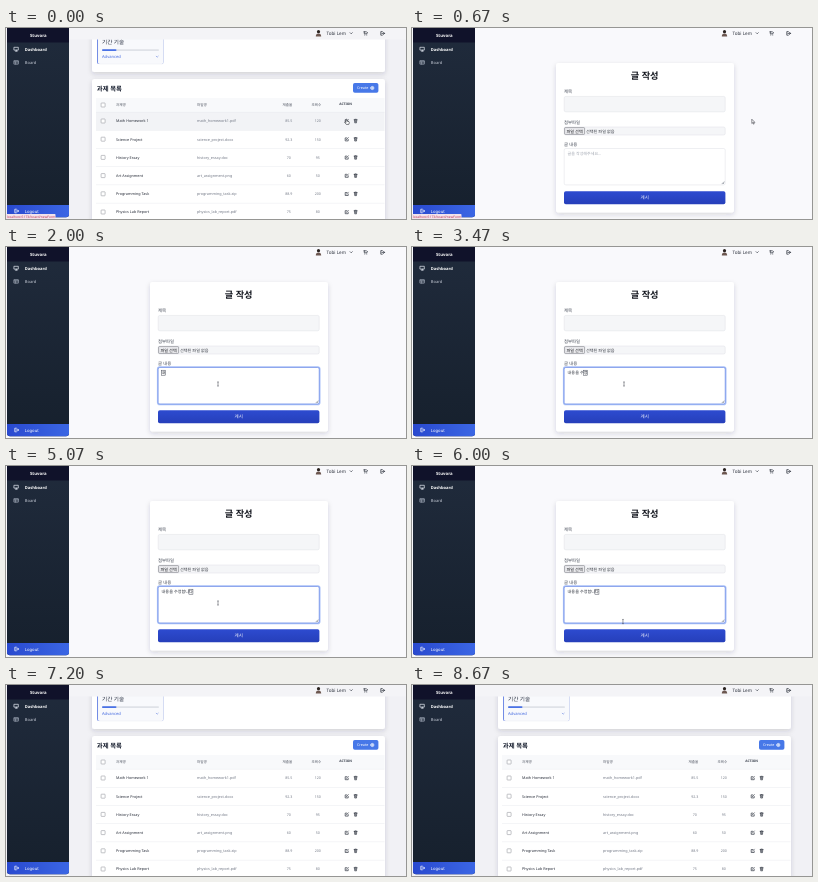
An HTML page that plays this animation: 400x191 px, repeating every 8.74 s.

```html
<!DOCTYPE html>
<html lang="ko">
<head>
<meta charset="utf-8">
<title>Board editor</title>
<style>
  html, body { margin: 0; width: 100%; height: 100%; overflow: hidden; background: #f8f8fb; }
  svg { display: block; width: 100%; height: 100%; }
  text { font-family: "Noto Sans", "Noto Sans CJK KR", "Noto Sans CJK", sans-serif; text-rendering: geometricPrecision; white-space: pre; }
  .icon { fill: none; stroke-width: .7; stroke-linecap: round; stroke-linejoin: round; }
</style>
</head>
<body>
<svg id="stage" viewBox="0 0 400 191" preserveAspectRatio="none">
  <defs>
    <linearGradient id="side" x2="0" y2="1"><stop stop-color="#202b3c"/><stop offset="1" stop-color="#16202d"/></linearGradient>
    <linearGradient id="exit"><stop stop-color="#2949cf"/><stop offset="1" stop-color="#3b66e4"/></linearGradient>
    <linearGradient id="send" x2="0" y2="1"><stop stop-color="#2d4bd0"/><stop offset="1" stop-color="#263fba"/></linearGradient>
    <filter id="shadow" x="-10%" y="-15%" width="120%" height="135%"><feDropShadow dx="0" dy="2" stdDeviation="2.6" flood-color="#20243c" flood-opacity=".16"/></filter>
    <clipPath id="sideClip"><rect x="1" y="-4" width="62" height="193.3" rx="3"/></clipPath>
  </defs>
</svg>
<script>
const LOOP = 8740;
const stage = document.getElementById('stage');

function add(parent, tag, attrs = {}) {
  const el = document.createElementNS('http://www.w3.org/2000/svg', tag);
  for (const key in attrs) el.setAttribute(key, attrs[key]);
  return parent.appendChild(el);
}
const group = (parent, attrs) => add(parent, 'g', attrs);
const box = (parent, x, y, width, height, fill, more) =>
  add(parent, 'rect', { x, y, width, height, fill, ...more });
function label(parent, x, y, size, str, fill, more) {
  const el = add(parent, 'text', { x, y, 'font-size': size, fill, ...more });
  el.textContent = str;
  return el;
}
const icon = (parent, x, y, d, stroke, more) =>
  add(parent, 'path', { class: 'icon', d, stroke, transform: `translate(${x} ${y})`, ...more });
const show = (el, on) => el.setAttribute('visibility', on ? 'inherit' : 'hidden');

const middle = { 'text-anchor': 'middle' };
const bold = { 'font-weight': 700 };
const semi = { 'font-weight': 500 };
const EXIT = 'M0 -1.8h-1.5v3.6h1.5 M-.4 0h2.6 M1.2 -1.1l1.1 1.1l-1.1 1.1';
const PENCIL = 'M0 -1.3h-1.5v3h3v-1.5 M-.4 .5l2 -2.1';
const TRASH = 'M-1.5 -1.2h3 M-.5 -1.7h1 M-1.1 -1.2l.2 3h1.8l.2 -3 M0 -.4v1.4';

const list = group(stage);
const form = group(stage);
const chrome = group(stage);

// Board list
box(list, 0, 0, 400, 191, '#f1f1f5');
box(list, 86, -10, 293, 54, '#fff', { rx: 2.5, filter: 'url(#shadow)' });
box(list, 91, -10, 66.5, 46, '#3b5fe0', { rx: 2 });
box(list, 91.9, -10, 65.6, 46, '#f8f9fc', { rx: 1.8, stroke: '#e6e8f0', 'stroke-width': .4 });
label(list, 96, 16, 5.6, '기간 기술', '#2c3344', semi);
box(list, 96, 21.2, 57, 1.8, '#dfe2e8', { rx: .9 });
box(list, 96, 21.2, 14.5, 1.8, '#4a72e6', { rx: .9 });
label(list, 96, 30.2, 4.1, 'Advanced', '#456be0');
icon(list, 151.2, 28.7, 'M-1 -.5l1 1l1 -1', '#7d96e4');
box(list, 63, 0, 337, 11.5, '#f4f4f7');

box(list, 86, 51, 293, 150, '#fff', { rx: 2.5, filter: 'url(#shadow)' });
label(list, 90.8, 63, 6.4, '과제 목록', '#1c2333', bold);
box(list, 347, 55, 25.4, 9.8, '#4778e8', { rx: 1.8 });
label(list, 351, 61.3, 3.7, 'Create', '#fff');
icon(list, 366.3, 60, 'M-1.6 0a1.6 1.6 0 1 0 3.2 0a1.6 1.6 0 1 0 -3.2 0 M-.7 0h1.4 M0 -.7v1.4', '#fff', { 'stroke-width': .5 });
box(list, 90, 70, 288.5, 14, '#f8f9fb');

function checkbox(y) {
  box(list, 95.1, y - 2, 4, 4, '#fff', { rx: .5, stroke: '#85878e', 'stroke-width': .5 });
}
checkbox(77);
[[110, '과제명'], [191, '파일명'], [276.5, '제출율'], [305.5, '조회수']]
  .forEach(([x, str]) => label(list, x, 78.3, 3.5, str, '#4a505d', semi));
label(list, 339.6, 77.3, 3.3, 'ACTION', '#3a404d', { ...middle, ...bold });

const rows = [
  ['Math Homework 1', 'math_homework1.pdf', '85.5', 120],
  ['Science Project', 'science_project.docx', '92.3', 150],
  ['History Essay', 'history_essay.doc', '70', 95],
  ['Art Assignment', 'art_assignment.png', '60', 50],
  ['Programming Task', 'programming_task.zip', '88.9', 200],
  ['Physics Lab Report', 'physics_lab_report.pdf', '75', 80],
];
const hovers = rows.map(([name, file, rate, views], i) => {
  const y = 93 + i * 18.2;
  const hover = box(list, 90, y - 9, 288.5, 18.2, '#f2f3f6');
  box(list, 90, y - 9.1, 288.5, .4, '#e3e5ea');
  checkbox(y);
  label(list, 110, y + 1.3, 3.75, name, '#2b303c', semi);
  label(list, 191, y + 1.3, 3.75, file, '#757b88');
  label(list, 282.8, y + 1.3, 3.6, rate, '#757b88', middle);
  label(list, 311.8, y + 1.3, 3.6, views, '#757b88', middle);
  icon(list, 340.7, y, PENCIL, '#343a46');
  icon(list, 349.6, y, TRASH, '#343a46');
  return hover;
});

// Post form
box(form, 0, 0, 400, 191, '#f9f9fc');
box(form, 144, 35, 178, 149.5, '#fff', { rx: 2.5, filter: 'url(#shadow)' });
label(form, 232.7, 51, 9.2, '글 작성', '#14171f', { ...middle, ...bold });
[[65, '제목'], [96.4, '첨부파일'], [117.6, '글 내용']]
  .forEach(([y, str]) => label(form, 152, y, 4.4, str, '#414754'));
const field = { rx: 1.6, stroke: '#dcdfe5', 'stroke-width': .5 };
box(form, 152.2, 68.4, 161, 15.4, '#f5f6f8', field);
box(form, 152.2, 99, 161, 8, '#f5f6f8', field);
box(form, 152.6, 99.6, 20, 6.8, '#ececef', { rx: .8, stroke: '#62656c', 'stroke-width': .5 });
label(form, 162.6, 104.6, 4.1, '파일 선택', '#15171c', middle);
label(form, 174, 104.6, 4.1, '선택된 파일 없음', '#343841');
const ring = box(form, 151.7, 120, 162, 37.4, 'none', { rx: 2, stroke: '#a9c0f7', 'stroke-width': 1.6 });
const area = box(form, 152.2, 120.5, 161, 36.4, '#fff', field);
icon(form, 312, 155.8, 'M-2 0l2 -2 M-.8 0l.8 -.8', '#868b95', { 'stroke-width': .4 });
const hint = label(form, 155.6, 127, 4, '글을 작성해주세요...', '#a2a7b1');
const done = label(form, 155.6, 127, 4.1, '', '#262b36');
const draft = label(form, 155.6, 127, 4.1, '', '#1b1f28');
const frame = box(form, 155, 123.2, 4, 5, 'none', { stroke: '#343a48', 'stroke-width': .45 });
const caret = box(form, 155.4, 123.2, .5, 4.8, '#20242e');
box(form, 152, 163.2, 161.4, 13, 'url(#send)', { rx: 1.8 });
label(form, 232.7, 171.3, 4.5, '게시', '#fff', middle);

// Sidebar and top bar
const side = group(chrome, { 'clip-path': 'url(#sideClip)' });
box(side, 1, 0, 62, 190, 'url(#side)');
box(side, 1, 0, 62, 14.5, '#10122a');
box(side, 1, 177, 62, 13, 'url(#exit)');
label(side, 32.3, 9.3, 4.3, 'Stuvora', '#fff', { ...middle, ...bold });
icon(side, 10.3, 21, 'M-2 -1.7h4v2.8h-4z M0 1.1v1 M-1 2.1h2', '#e8ecf5');
label(side, 18.8, 22.7, 4.05, 'Dashboard', '#fff', bold);
icon(side, 10.3, 34.4, 'M-2 -1.7h4v3.4h-4z M-2 -.5h4 M-.6 -.5v2.2', '#aab2c0');
label(side, 18.8, 36, 4.05, 'Board', '#c3c9d4');
icon(side, 10.3, 183, EXIT, '#fff');
label(side, 18.8, 184.6, 4.2, 'Logout', '#fff');

add(chrome, 'circle', { cx: 312.5, cy: 3.7, r: 1.6, fill: '#2b2320' });
add(chrome, 'path', { d: 'M309.8 8.5q0 -3 2.7 -3t2.7 3z', fill: '#6c5750' });
label(chrome, 320.5, 7, 4.6, 'Tobi Lem', '#2b303b', semi);
icon(chrome, 345.2, 5.2, 'M-1.1 -.5l1.1 1.1l1.1 -1.1', '#343a46');
icon(chrome, 359.5, 5.3, 'M-1.6 -1.5h2.4 M-1.2 -1.5v2h2.6l.5 -1.4 M-.8 1.7h.1 M1.2 1.7h.1', '#252a34');
icon(chrome, 376.3, 5.4, EXIT, '#252a34');

const status = group(chrome);
box(status, 0, 186, 49.5, 5, '#f2e2ea', { rx: .8 });
label(status, .8, 189.7, 3.3, 'localhost:5173/board/newForm', '#bd3558');

// Pointer shapes, hot spot at 0,0
const pointer = group(stage);
const shape = (d, fill, stroke, width) =>
  add(pointer, 'path', { d, fill, stroke, 'stroke-width': width, 'stroke-linejoin': 'round' });
const pointers = {
  arrow: shape('M-.7 -1.8v4.3l1 -.9l.7 1.6l.7 -.3l-.7 -1.5h1.4z', '#fff', '#20232b', .5),
  hand: shape('M-.6 -1.5q.5 -.6 1 0v1.6l2 .5q.6 .3 .4 1.2l-.5 1.6h-2.5l-1.5 -2q0 -.7 .7 -.4l.4 .4z', '#fff', '#171a22', .55),
  beam: shape('M-.9 -2.2q.9 0 .9 .5q0 -.5 .9 -.5 M0 -1.7v3.4 M-.9 2.2q.9 0 .9 -.5q0 .5 .9 .5', 'none', '#343943', .5),
};

const OPEN = 330, FOCUS = 1560, BLUR = 6470, CLOSE = 6730, LEAVE = 7070;
const path = [[0, 340.5, 93], [780, 340.5, 93], [960, 312, 97], [1500, 212, 137], [5720, 212, 137], [6260, 210, 172], [LOOP, 210, 172]];

// time, committed text, syllable being composed
const typing = [
  [0, '', ''], [1820, '', 'ㄴ'], [1950, '', '내'],
  [2270, '내', 'ㅇ'], [2400, '내', '요'], [2600, '내', '용'],
  [2860, '내용', 'ㅇ'], [2940, '내용', '으'], [3010, '내용', '을'], [3090, '내용을 ', ''],
  [3150, '내용을 ', 'ㅅ'], [3220, '내용을 ', '수'],
  [3290, '내용을 수', 'ㅈ'], [3360, '내용을 수', '저'], [3450, '내용을 수', '정'],
  [4130, '내용을 수정', 'ㅎ'], [4330, '내용을 수정', '하'], [4530, '내용을 수정', '합'],
  [4730, '내용을 수정합', 'ㄴ'], [4800, '내용을 수정합', '니'],
  [4930, '내용을 수정합니', 'ㄷ'], [5000, '내용을 수정합니', '다'],
  [BLUR, '내용을 수정합니다', ''],
];

function pointerAt(t) {
  const i = path.findIndex(step => step[0] > t);
  const [t0, x0, y0] = path[i - 1], [t1, x1, y1] = path[i];
  const p = (t - t0) / (t1 - t0), e = p * p * (3 - 2 * p);
  return [x0 + (x1 - x0) * e, y0 + (y1 - y0) * e];
}

function drawText(t, focused) {
  const [, text, syllable] = typing.findLast(step => step[0] <= t);
  done.textContent = text;
  draft.textContent = syllable;
  const x = 155.6 + (text ? done.getComputedTextLength() : 0);
  draft.setAttribute('x', x);
  frame.setAttribute('x', x - .1);
  caret.setAttribute('x', x);
  show(hint, !text && !syllable);
  show(frame, syllable);
  show(caret, focused && !syllable && (t - FOCUS) % 1000 < 500);
}

function render(t) {
  const editing = t >= OPEN && t < CLOSE;
  const focused = t >= FOCUS && t < BLUR;
  show(list, !editing);
  show(form, editing);
  show(status, t < 860);
  rows.forEach((row, i) => hovers[i].setAttribute('visibility',
    !editing && ((i === 0 && t < OPEN) || (i === 4 && t >= CLOSE && t < LEAVE)) ? 'visible' : 'hidden'));

  show(ring, focused);
  area.setAttribute('stroke', focused ? '#3f66dd' : '#dcdfe5');
  if (editing) drawText(t, focused);
  else [hint, frame, caret].forEach(el => show(el, false));

  const [x, y] = pointerAt(t);
  pointer.setAttribute('transform', `translate(${x} ${y})`);
  show(pointer, t < LEAVE);
  const inside = x > 152 && x < 313;
  const kind = t < OPEN || (editing && inside && y > 163) ? 'hand'
    : editing && inside && y > 120 && y < 157 ? 'beam' : 'arrow';
  for (const name in pointers) show(pointers[name], name === kind);
}

const start = performance.now();
function tick() {
  render((performance.now() - start) % LOOP);
  requestAnimationFrame(tick);
}
tick();
</script>
</body>
</html>
```
